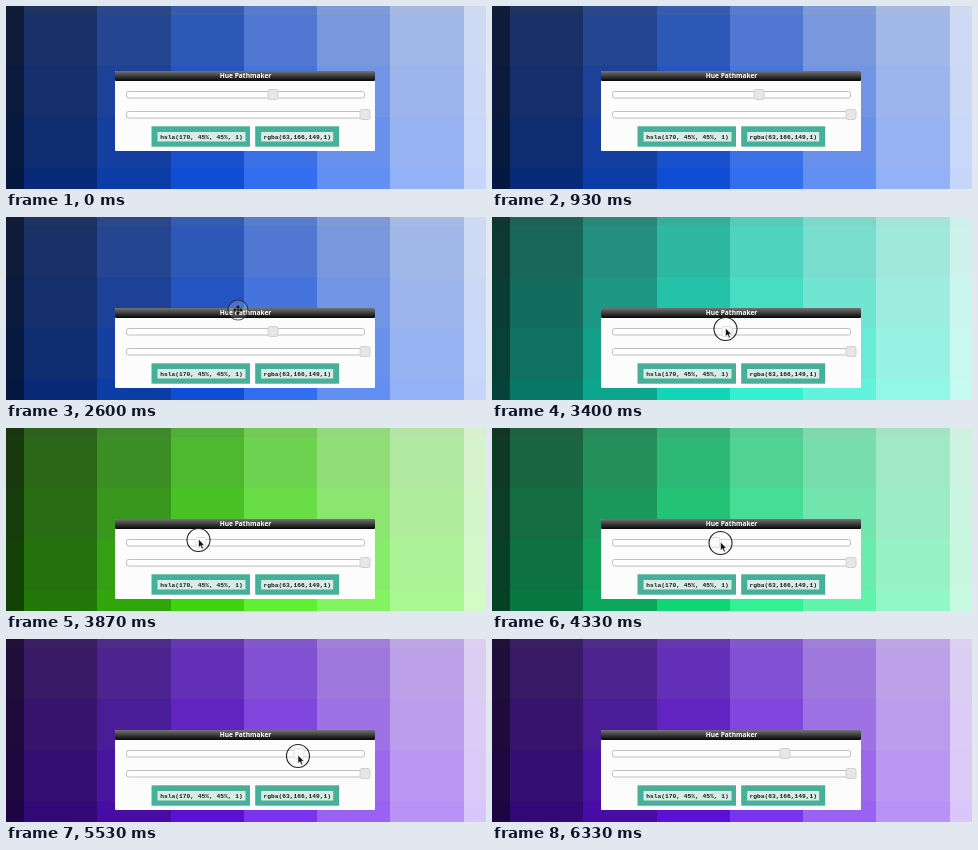
Recreate the animation shown at these times as an HTML page. Size 480 by 183 pixels, loop 6.39 s.

```html
<!DOCTYPE html>
<html lang="en">
<head>
<meta charset="utf-8">
<title>Hue Pathmaker</title>
<style>
  html, body { margin: 0; width: 100%; height: 100%; overflow: hidden; background: #fff; }
  svg { display: block; width: 480px; height: 183px; }
  text { text-anchor: middle; }
  .title { font: bold 6.6px "Open Sans", "DejaVu Sans", sans-serif; fill: #fff; }
  .code { font: bold 6.25px "Liberation Mono", "Courier New", monospace; fill: #1c1c1c; }
  .track { fill: #fefefe; stroke: #b9b7b9; stroke-width: .9; }
  .thumb { fill: #e7e6e7; stroke: #cfcecf; stroke-width: .9; }
  .button { fill: #48b099; }
  .label { fill: #d6ece5; }
</style>
</head>
<body>
<svg viewBox="0 0 480 183">
  <defs>
    <linearGradient id="bar" x2="0" y2="1">
      <stop offset="0" stop-color="#747474"/>
      <stop offset=".5" stop-color="#3c3c3c"/>
      <stop offset="1" stop-color="#060606"/>
    </linearGradient>
  </defs>
  <g id="grid" shape-rendering="crispEdges"></g>
  <g id="panel">
    <rect width="260" height="80" rx="1" fill="#fdfcfd"/>
    <rect width="260" height="10" rx="1" fill="url(#bar)"/>
    <text class="title" x="130.5" y="6.6">Hue Pathmaker</text>
    <rect class="track" x="11.5" y="20.5" width="238" height="6.5" rx="2"/>
    <rect class="track" x="11.5" y="40.5" width="238" height="6.5" rx="2"/>
    <rect class="thumb" id="hue" x="-5" y="18.5" width="10" height="10" rx="2"/>
    <rect class="thumb" x="245" y="38.5" width="10" height="10" rx="2"/>
    <rect class="button" x="36.5" y="55.3" width="98.5" height="20.4"/>
    <rect class="button" x="140.2" y="55.3" width="84" height="20.4"/>
    <rect class="label" x="42.5" y="61" width="88" height="9.5"/>
    <rect class="label" x="146.2" y="61" width="72" height="9.5"/>
    <text class="code" x="86.5" y="67.7">hsla(170, 45%, 45%, 1)</text>
    <text class="code" x="182.3" y="67.7">rgba(63,166,149,1)</text>
  </g>
  <g id="pointer">
    <circle id="ring" r="11.5" fill="#fff" fill-opacity=".25" stroke="#222" stroke-width="1.1"/>
    <path id="arrow" d="M0 -1V7.5L2 5.8L3.4 9L4.9 8.3L3.5 5.3H6Z" fill="#111" stroke="#fff" stroke-width=".6"/>
    <path id="move" d="M-4 0H4M0 -4V4M-2.5 -1.5L-4 0L-2.5 1.5M2.5 -1.5L4 0L2.5 1.5M-1.5 -2.5L0 -4L1.5 -2.5M-1.5 2.5L0 4L1.5 2.5"
      fill="none" stroke="#111" stroke-width="1.1"/>
  </g>
</svg>
<script>
const LOOP = 6390, FPS = 15, LAG = 60;
const HUE_START = 128.5, HUE_PER_PX = 1.6;
const PANEL_X = 109;
const lights = [14, 25, 35, 45, 57, 67, 77, 88];
const sats = [52, 60, 69, 78, 86];

// [time, x, y] of the pointer
const path = [
  [1400, 232, -14], [1800, 232, 67], [2070, 232, 67], [2600, 232, 93],
  [2760, 232, 93], [3000, 266, 112], [3130, 266, 112], [3340, 234, 112],
  [3400, 233.5, 112], [3800, 194, 112], [3980, 190, 112], [4330, 228, 115],
  [4735, 292, 117], [5900, 292, 117], [6200, 300, 200]
];
const panelDrag = [2000, 2670], hueDrag = [3060, 5750];

const $ = id => document.getElementById(id);
const within = (t, [a, b]) => t >= a && t <= b;
const clamp = (t, a, b) => Math.min(Math.max(t, a), b);
const show = (el, on) => el.setAttribute("visibility", on ? "visible" : "hidden");
const shift = (el, x, y) => el.setAttribute("transform", `translate(${x} ${y})`);

function pointerAt(t) {
  const i = path.findIndex(p => p[0] > t);
  if (i === 0) return path[0].slice(1);
  if (i < 0) return path[path.length - 1].slice(1);
  const [a, b] = [path[i - 1], path[i]];
  const u = (t - a[0]) / (b[0] - a[0]);
  return [1, 2].map(k => a[k] + (b[k] - a[k]) * u);
}

const cells = [];
sats.forEach((sat, row) => lights.forEach((light, col) => {
  const el = document.createElementNS("http://www.w3.org/2000/svg", "rect");
  const box = { x: Math.round(-55.2 + col * 73.25), y: row * 51 - 42, width: 74, height: 51 };
  for (const key in box) el.setAttribute(key, box[key]);
  $("grid").append(el);
  cells.push({ el, sat, light });
}));

function draw(t) {
  const [x, y] = pointerAt(t);
  const panelY = pointerAt(clamp(t, 1800, 2600))[1] - 2;
  const thumbX = pointerAt(clamp(t - LAG, ...hueDrag))[0] + 1;
  const hue = (thumbX - HUE_START) * HUE_PER_PX;

  for (const { el, sat, light } of cells) el.setAttribute("fill", `hsl(${hue} ${sat}% ${light}%)`);
  shift($("panel"), PANEL_X, panelY);
  shift($("hue"), thumbX - PANEL_X, 0);
  $("hue").style.fill = within(t, hueDrag) ? "#fafafa" : "";

  const active = t >= path[0][0];
  const onBar = y >= panelY && y <= panelY + 10;
  const moving = within(t, [1830, panelDrag[1]]);
  show($("pointer"), active);
  shift($("pointer"), x, y);
  show($("move"), active && onBar);
  show($("arrow"), active && !onBar);
  show($("ring"), moving || within(t, hueDrag));
  $("ring").setAttribute("r", moving ? 10 : 11.5);
  $("ring").setAttribute("opacity", moving ? .7 : 1);
}

function tick() {
  const t = performance.now() % LOOP;
  draw(Math.floor((t + 5) * FPS / 1000) * 1000 / FPS);
  requestAnimationFrame(tick);
}
tick();
</script>
</body>
</html>
```
